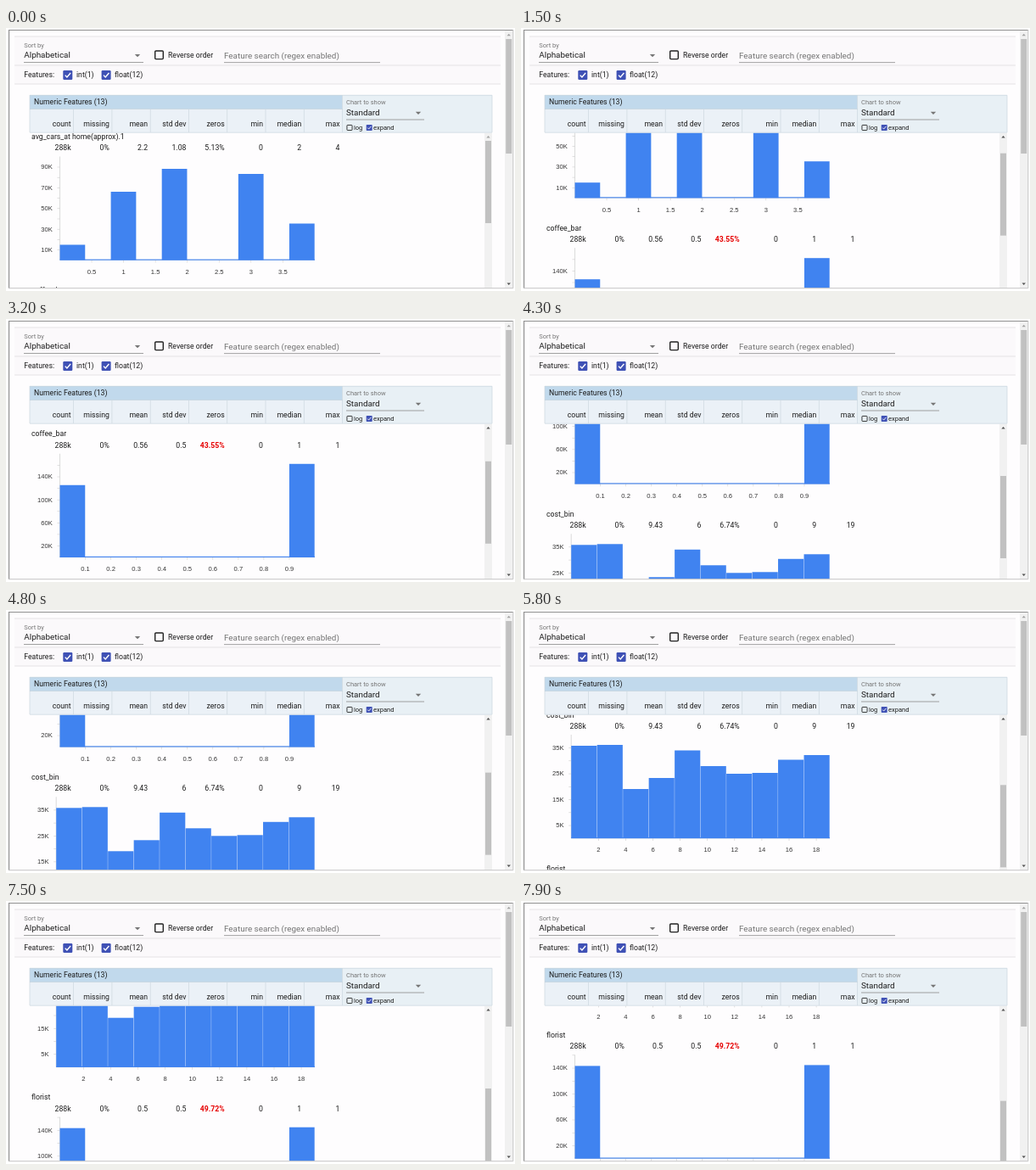
These frames come from a looping animation (600 by 310 pixels, 8000 ms). An HTML page:

```html
<!DOCTYPE html>
<html lang="en">
<head>
<meta charset="utf-8">
<title>Feature statistics</title>
<style>
  html, body { margin: 0; width: 100%; height: 100%; overflow: hidden; background: #fff; }
  svg { display: block; }
  text { font: 8.7px Roboto, "Liberation Sans", sans-serif; fill: #1c1c1c; }
  .big { font-size: 9.9px; }
  .small { font-size: 7.5px; }
  .axis { font-size: 7.6px; fill: #333; font-family: "Liberation Sans", Roboto, sans-serif; }
  .dim { fill: #757575; }
  .alert { fill: #e60000; font-weight: bold; }
  .end { text-anchor: end; }
  .mid { text-anchor: middle; }
</style>
</head>
<body>
<svg id="stage" width="600" height="310" viewBox="0 0 600 310"></svg>
<script>
const LOOP = 8000, NOTCH = 73.3, PERIOD = 181, COLUMN = 45.27, FIRST_COLUMN = 76.6;
const BLUE = '#4083f0', INDIGO = '#3f51b5';

const rect = (x, y, w, h, fill, more = '') =>
  `<rect x="${x}" y="${y}" width="${w}" height="${h}" fill="${fill}" ${more}/>`;
const text = (x, y, value, cls = '') => `<text x="${x}" y="${y}" class="${cls}">${value}</text>`;
const path = (d, fill, more = '') => `<path d="${d}" fill="${fill}" ${more}/>`;
const triangle = (x, y, w, h, fill, more) =>
  path(`M${x - w / 2} ${y - h / 2}h${w}l${-w / 2} ${h}z`, fill, more);

function checkbox(x, y, size, checked) {
  const s = size / 11;
  const box = checked
    ? rect(0, 0, 11, 11, INDIGO, 'rx="1.2"') +
      path('M2.4 5.6L4.6 8L8.8 3', 'none', 'stroke="#fff" stroke-width="1.4"')
    : rect(.7, .7, 9.6, 9.6, 'none', 'rx="1" stroke="#222" stroke-width="1.4"');
  return `<g transform="translate(${x} ${y}) scale(${s})">${box}</g>`;
}

const row = (values, y) => values.map((v, i) =>
  text(FIRST_COLUMN + i * COLUMN, y, v, parseFloat(v) > 20 && v.endsWith('%') ? 'end alert' : 'end')).join('');

// left: chart edge; unit: pixels per x unit; perK: pixels per thousand
const twoBars = (first, last) => [first, 0, 0, 0, 0, 0, 0, 0, 0, last];
const features = [
  { name: 'avg_cars_at home(approx).1', stats: '288k 0% 2.2 1.08 5.13% 0 2 4',
    left: 63.5, heights: [18, 0, 80.5, 0, 107.5, 0, 0, 101.5, 0, 43],
    unit: 75.1, xStep: .5, xCount: 7, perK: 1.22, yStart: 10, yStep: 20, yCount: 5 },
  { name: 'coffee_bar', stats: '288k 0% 0.56 0.5 43.55% 0 1 1',
    left: 63.5, heights: twoBars(85, 110),
    unit: 300.5, xStep: .1, xCount: 9, perK: .679, yStart: 20, yStep: 40, yCount: 4 },
  { name: 'cost_bin', stats: '288k 0% 9.43 6 6.74% 0 9 19',
    left: 59.2, heights: [109, 110, 58, 71, 103.5, 85, 76, 77, 92.5, 98],
    unit: 16.05, xStep: 2, xCount: 9, perK: 3.05, yStart: 5, yStep: 10, yCount: 4 },
  { name: 'florist', stats: '288k 0% 0.5 0.5 49.72% 0 1 1',
    left: 63.5, heights: twoBars(109, 110),
    unit: 300.5, xStep: .1, xCount: 9, perK: .762, yStart: 20, yStep: 40, yCount: 4 }
];

function section(f, index) {
  const base = 273.5, right = 364, width = (right - f.left) / f.heights.length;
  let out = text(30, 131.2, f.name) + row(f.stats.split(' '), 144.4);
  out += path(`M${f.left} ${base - 122}V${base}H${right}`, 'none', 'stroke="#ccc" stroke-width=".7"');
  for (let k = f.yStep / 2; k * f.perK < 122; k += f.yStep / 2)
    out += rect(f.left - 3, base - k * f.perK, 3, .6, '#ccc');
  for (let i = 0; i < f.yCount; i++) {
    const k = f.yStart + i * f.yStep;
    out += text(f.left - 8.7, base - k * f.perK + 2.7, k + 'K', 'axis end');
  }
  for (let i = 1; i <= f.xCount; i++) {
    const v = i * f.xStep, x = f.left + v * f.unit;
    out += rect(x - .3, base, .6, 3, '#ccc') + text(x, base + 16.4, +v.toFixed(1), 'axis mid');
  }
  f.heights.forEach((h, i) => {
    out += rect(f.left + i * width, base - h, width - .3, h, BLUE);
  });
  out += rect(f.left, base - .9, right - f.left, 1.1, BLUE);
  return `<g transform="translate(0 ${index * PERIOD})">${out}</g>`;
}

function controls() {
  return rect(10, 10, 573, 56, '#fbf9fb') +
    [10, 44, 66].map(y => rect(10, y - .4, 573, .8, '#dedcde')).join('') +
    text(21.3, 22.6, 'Sort by', 'small dim') + text(21.3, 35.4, 'Alphabetical', 'big') +
    triangle(155, 32.6, 6.4, 3.2, '#757575') + rect(21, 40, 141, .8, '#8a8a8a') +
    checkbox(175, 26.3, 11) + text(191, 35, 'Reverse order') +
    text(257, 35.5, 'Feature search (regex enabled)', 'big dim') + rect(257, 40.3, 184, .8, '#8a8a8a') +
    text(21.3, 58.4, 'Features:') +
    checkbox(67.3, 50, 11, true) + text(83, 58.4, 'int(1)') +
    checkbox(112.6, 50, 11, true) + text(128, 58.4, 'float(12)');
}

function tableHead() {
  let out = rect(28, 79, 368.5, 16.3, '#c1d9ec') + rect(28, 95.3, 368.5, 28, '#ebf1f7') +
    rect(396.5, 79, 176.5, 44.3, '#e8f0f5') +
    path('M28 79.3H573V123M28 123.2H573M28 79V123M396.5 79V123', 'none', 'stroke="#cbd6de" stroke-width=".7"') +
    rect(28, 95, 368.5, .6, '#b3c8d8') + text(33, 90.2, 'Numeric Features (13)');
  for (let i = 0; i < 7; i++) out += rect(79.3 + i * COLUMN, 96, .7, 27, '#cdd7df');
  return out + row(['count', 'missing', 'mean', 'std dev', 'zeros', 'min', 'median', 'max'], 115.8) +
    text(401, 89.6, 'Chart to show', 'small dim') + text(401, 103.2, 'Standard', 'big') +
    triangle(486, 100.3, 6.4, 3.2, '#757575') + rect(401, 107.6, 92, .8, '#8a8a8a') +
    checkbox(401.5, 114, 7, false) + text(410, 120.2, 'log', 'small') +
    checkbox(424.7, 114, 7, true) + text(433, 120.2, 'expand', 'small');
}

document.getElementById('stage').innerHTML =
  `<clipPath id="view">${rect(28, 123.5, 545, 183)}</clipPath>` +
  rect(3, 2, 595, 305, '#fefdfe') + controls() +
  `<g clip-path="url(#view)"><g id="list">${features.map(section).join('')}</g>` +
  rect(564, 123.5, 9, 183, '#f1f1f1') +
  triangle(568.5, 128.3, 4.4, -2.6, '#505050', 'id="up"') +
  rect(565, 133, 7, 97, '#c1c1c1', 'id="thumb"') + '</g>' + tableHead() +
  rect(588, 3, 9.5, 303, '#f1f1f1') + rect(589.2, 13, 7, 135, '#c1c1c1') +
  triangle(592.7, 8, 4.4, -2.6, '#a3a3a3') + triangle(592.7, 301.8, 4.4, 2.6, '#505050') +
  path('M3.5 307V2.5H598', 'none', 'stroke="#8f8f8f" stroke-width="1.2"') +
  path('M3 306.7H597.8V2', 'none', 'stroke="#c4c4c4" stroke-width="1"');

const quick = [.55, .95, 1], slow = [.37, .88, .99, 1];
const notches = [[1000, quick], [2000, slow], [3200, slow], [4300, quick],
  [5000, slow], [6800, slow], [7700, quick]];

function scrollAt(t) {
  return NOTCH * notches.reduce((sum, [start, ease]) => {
    const step = Math.floor((t - start) / 100);
    return sum + (step < 0 ? 0 : ease[Math.min(step, ease.length - 1)]);
  }, 0);
}

const list = document.getElementById('list');
const thumb = document.getElementById('thumb');
const up = document.getElementById('up');

function draw() {
  const scroll = scrollAt(performance.now() % LOOP);
  list.setAttribute('transform', `translate(0 ${-scroll})`);
  thumb.setAttribute('y', 133 + scroll * .2);
  up.setAttribute('fill', scroll ? '#505050' : '#a3a3a3');
  requestAnimationFrame(draw);
}
draw();
</script>
</body>
</html>
```
